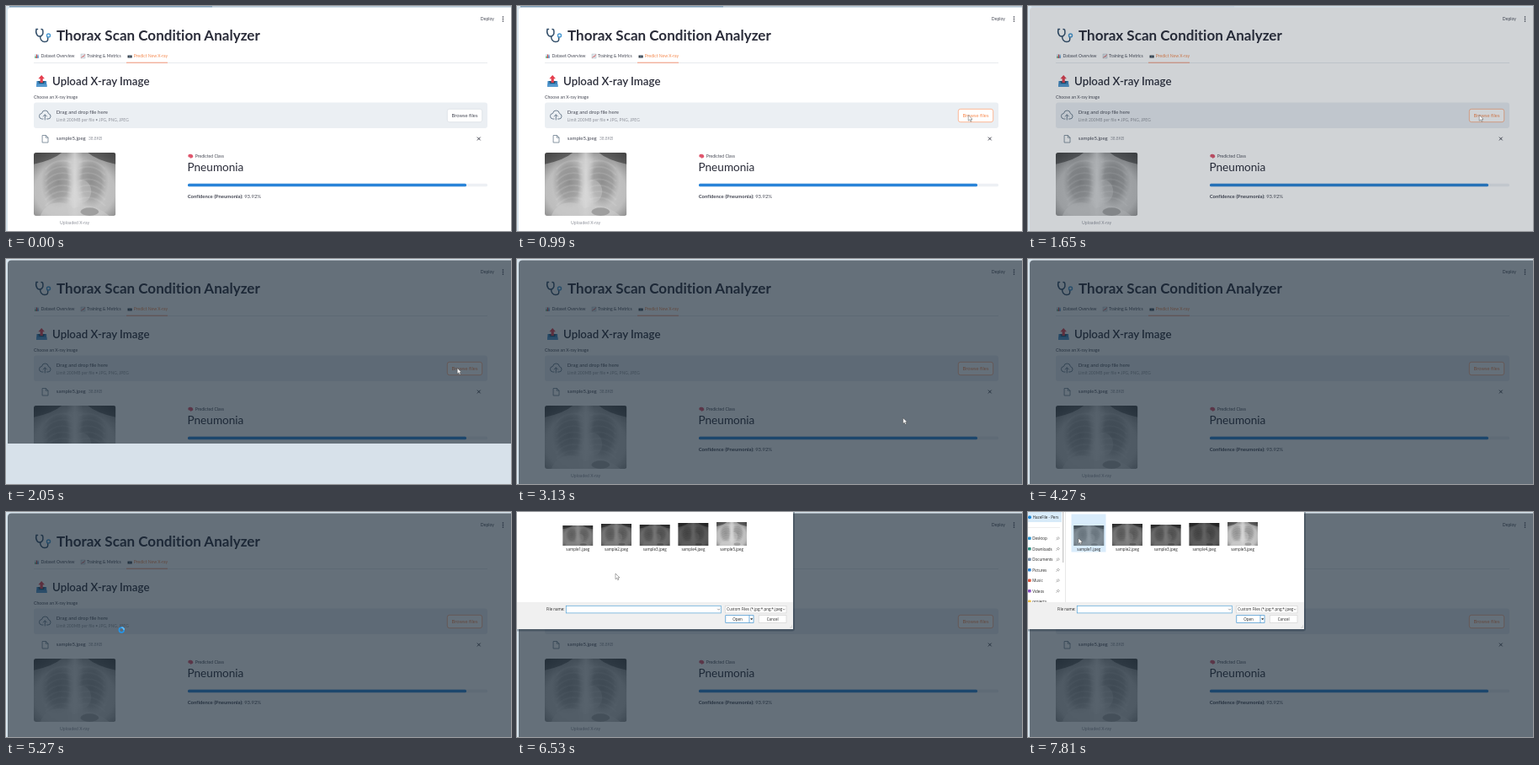
An HTML page that plays this animation: 600 px wide and 267 px high, repeating every 8 s.

```html
<!DOCTYPE html>
<html lang="en">
<head>
<meta charset="utf-8">
<title>Upload demo</title>
<style>
html, body { margin: 0; width: 100%; height: 100%; overflow: hidden; background: #fff; }
svg { display: block; }
#stage { width: 600px; height: 267px; }
text { font-family: Lato, sans-serif; fill: #484b57; white-space: pre; font-variant-ligatures: none; }
.strong { fill: #2b2d3a; }
.grey { fill: #92959e; }
#dialog text { font-family: "Open Sans", "Noto Sans", sans-serif; font-size: 4.5px; fill: #222; }
</style>
</head>
<body>
<svg id="stage" viewBox="0 0 600 267">
  <defs>
    <radialGradient id="lung">
      <stop offset="0" stop-color="#555" stop-opacity=".5"/>
      <stop offset=".6" stop-color="#5c5c5c" stop-opacity=".36"/>
      <stop offset="1" stop-color="#777" stop-opacity="0"/>
    </radialGradient>
    <radialGradient id="body" cx=".5" cy=".6" r=".75">
      <stop offset="0" stop-color="#d2d2d2"/>
      <stop offset=".65" stop-color="#bdbdbd"/>
      <stop offset="1" stop-color="#6a6a6a"/>
    </radialGradient>
    <linearGradient id="spine">
      <stop offset="0" stop-color="#dcdcdc" stop-opacity="0"/>
      <stop offset=".5" stop-color="#dcdcdc" stop-opacity=".7"/>
      <stop offset="1" stop-color="#dcdcdc" stop-opacity="0"/>
    </linearGradient>
    <symbol id="scan" viewBox="0 0 100 77" preserveAspectRatio="none">
      <rect width="100" height="77" fill="url(#body)"/>
      <path d="M0 0H34Q24 9 0 14ZM100 0H66Q76 9 100 14Z" fill="#222" opacity=".5"/>
      <ellipse cx="30" cy="36" rx="21" ry="33" fill="url(#lung)"/>
      <ellipse cx="70" cy="35" rx="21" ry="33" fill="url(#lung)"/>
      <rect x="40" width="20" height="77" fill="url(#spine)"/>
      <ellipse cx="58" cy="47" rx="12" ry="14" fill="#d4d4d4" opacity=".35"/>
      <path id="ribs" fill="none" stroke="#eee" stroke-width="2" opacity=".13"/>
      <path d="M8 77Q14 62 28 61T48 68Q70 58 92 77Z" fill="#ccc" opacity=".6"/>
      <ellipse cx="68" cy="72" rx="11" ry="5" fill="#555" opacity=".35"/>
    </symbol>
    <clipPath id="photo"><rect x="33" y="174" width="97.500" height="75" rx="3"/></clipPath>
  </defs>

  <rect width="600" height="267" fill="#d7e4ed"/>
  <path d="M2 267V6Q2 1.500 6.500 1.500H600V267Z" fill="#fff"/>
  <g id="topline"><path d="M4 .7H245" stroke="#7d9cb5" stroke-width="1.400"/><path d="M245 .7H600" stroke="#b3c5d3" stroke-width="1.400"/></g>

  <g id="page">
    <!-- stethoscope -->
    <g fill="none" stroke="#35506b" stroke-width="1.500" stroke-linecap="round">
      <path d="M37.500 27.500H36Q35 32 37 34.500T42 35.500Q45 33 43.500 28L42 27.500M40.500 36Q41 42.500 46 42.500T49.500 37"/>
      <circle cx="50.500" cy="35" r="2" stroke="#4b9ad2"/>
    </g>

    <!-- tabs -->
    <path d="M33 67.500H572" stroke="#e3e6ea" stroke-width=".8"/>
    <path d="M143 67.200H192" stroke="#f9805c" stroke-width=".8"/>
    <rect x="34" y="57" width="5" height="5" fill="#dbe6ef"/>
    <path d="M35 62V59.500" stroke="#3a9c58" stroke-width="1.100"/><path d="M36.500 62V57.500" stroke="#d74545" stroke-width="1.100"/><path d="M38 62V58.500" stroke="#2c79c5" stroke-width="1.100"/>
    <rect x="89" y="57" width="5" height="5" fill="#e3e9ee" stroke="#9caab5" stroke-width=".4"/>
    <path d="M89.500 61.500L91 59.500L92 60.300L93.700 57.500" fill="none" stroke="#cf4545" stroke-width=".7"/>
    <path d="M144.500 58.500H149.700V61.500H144.500Z" fill="#36414c"/><circle cx="147.100" cy="60" r=".8" fill="#7fa3bd"/>

    <!-- outbox -->
    <path d="M36.500 89H48L48.500 96H36Z" fill="#3f88c2"/><path d="M38 89H46.500L45 92H39.500Z" fill="#235577"/><path d="M36 93H48.500V96H36Z" fill="#559acf"/>
    <path d="M42.200 82L46 86.300H43.800V91H40.600V86.300H38.400Z" fill="#e5404f"/>

    <!-- uploader -->
    <rect x="33" y="114.500" width="539" height="30.500" rx="3" fill="#ebeff3"/>
    <g fill="none" stroke="#6d7e8f" stroke-width="1" stroke-linecap="round" stroke-linejoin="round">
      <path d="M44 134H42.500Q39.300 133.500 39.500 130.500T42.500 127.500Q43 124 46.500 124T50.500 127.700Q53.300 128.300 53 131.200T50 134H48.500M46.300 135V129M44.200 131L46.300 128.900L48.400 131"/>
      <path d="M43.500 153.500H47.500L50 156V162H43.500ZM47.300 153.700V156.200H49.800" stroke-width=".8"/>
    </g>
    <rect id="btn" x="524.300" y="122.300" width="41.400" height="15.400" rx="2.500" fill="#fff" stroke-width=".7"/>
    <path d="M559.900 155.600L563.700 159.400M563.700 155.600L559.900 159.400" stroke="#31333f" stroke-width=".9"/>

    <!-- result -->
    <g clip-path="url(#photo)"><use href="#scan" x="33" y="174" width="97.500" height="75"/></g>
    <path d="M216.200 178Q216.500 175.500 219 175.800Q222 175.800 222.300 178.500Q222 180.500 220.300 180.200L219.500 181L218.700 179.800Q216.500 180 216.200 178Z" fill="#e0566d"/>
    <rect x="216" y="210.700" width="356" height="3.600" rx="1.500" fill="#edf0f4"/>
    <rect x="216" y="210.700" width="331" height="3.600" rx="1.500" fill="#2a84d8"/>
    <g fill="#31333f"><circle cx="590.500" cy="13" r=".8"/><circle cx="590.500" cy="15.500" r=".8"/><circle cx="590.500" cy="18" r=".8"/></g>
  </g>

  <path id="dim" d="M2 267V6Q2 1.500 6.500 1.500H600V267Z" fill="#162736"/>
  <rect id="sheet" x="1" y="219" width="599" height="48" fill="#d7e1ea"/>

  <g id="dialog">
    <rect x="-8" y="-8" width="338" height="149.500" rx="3" fill="#122636" opacity=".3"/>
    <rect x="-20" y="-20" width="348" height="159" fill="#fff"/>
    <rect x="-20" y="107" width="348" height="32" fill="#f0f0f0"/>
    <g fill="#fff" stroke-width=".7">
      <rect x="58.300" y="111.300" width="184" height="8.600" stroke="#56a3d6"/>
      <rect x="247.300" y="111.300" width="72.700" height="8.600" stroke="#d5d5d5"/>
      <rect x="247.800" y="122.700" width="33.200" height="8.600" stroke="#3b8fce"/>
      <rect x="287.300" y="122.700" width="32.700" height="8.600" stroke="#d5d5d5"/>
      <path d="M276 122.700V131.300" stroke="#3b8fce"/>
    </g>
    <path d="M238.300 114.900L239.600 116.200L240.900 114.900M315.800 114.900L317.100 116.200L318.400 114.900" fill="none" stroke="#555" stroke-width=".6"/>
    <path d="M277.200 126.300H280.200L278.700 128.200Z" fill="#222"/>
    <path d="M326.500 134.500V137H324" fill="none" stroke="#aaa" stroke-width=".7" stroke-dasharray=".8 .7"/>
    <g id="files"></g>
    <g id="side">
      <rect x="0" y="0" width="45" height="107" fill="#fff"/>
      <rect x="0" y="0" width="40" height="12" fill="#d8ebf9"/>
      <path d="M0 18.500H38" stroke="#e2e2e2" stroke-width=".6"/>
      <path d="M44.500 0V107" stroke="#e2e2e2" stroke-width=".8"/>
      <path d="M41.700 0V60" stroke="#c4c4c4" stroke-width="1.200"/>
    </g>
  </g>

  <path id="arrow" d="M0 0V6.700L1.600 5.300L2.700 7.700L3.900 7.200L2.800 4.900H4.900Z" fill="#fff" stroke="#444" stroke-width=".45"/>
  <g id="busy">
    <circle r="2.900" fill="none" stroke="#2496ea" stroke-width="1.600"/>
    <path id="spin" d="M0 -2.900A2.900 2.900 0 0 1 2.900 0" fill="none" stroke="#62bdfa" stroke-width="1.600"/>
  </g>
</svg>

<script>
const $ = id => document.getElementById(id);

function add(parent, tag, attrs, label) {
  const el = document.createElementNS("http://www.w3.org/2000/svg", tag);
  for (const k in attrs) el.setAttribute(k, attrs[k]);
  if (label) el.textContent = label;
  return parent.appendChild(el);
}

function write(parent, x, y, size, label, extra) {
  return add(parent, "text", { x, y, "font-size": size, ...extra }, label);
}

// Page text
const page = $("page"), grey = { class: "grey" }, strong = { class: "strong" };
const middle = { "text-anchor": "middle" };
write(page, 60, 41, 17.05, "Thorax Scan Condition Analyzer", { "font-weight": 700, ...strong });
write(page, 55, 94, 13.3, "Upload X-ray Image", { "font-weight": 600, ...strong });
write(page, 41.5, 61.3, 5.05, "Dataset Overview");
write(page, 96, 61.3, 5.1, "Training & Metrics");
write(page, 151.8, 61.3, 5.05, "Predict New X-ray", { style: "fill:#f58a50" });
write(page, 33, 109.7, 5.2, "Choose an X-ray image");
write(page, 59.8, 127.8, 6.05, "Drag and drop file here");
write(page, 59.8, 137.3, 5, "Limit 200MB per file • JPG, PNG, JPEG", grey);
const btnText = write(page, 545, 132.1, 5.8, "Browse files", middle);
write(page, 59.8, 159.3, 6.1, "sample5.jpeg");
write(page, 98, 159.3, 4.9, "38.8KB", grey);
write(page, 81.7, 258.8, 5.15, "Uploaded X-ray", { ...middle, ...grey });
write(page, 224.8, 180.3, 5.1, "Predicted Class");
write(page, 215.5, 196.3, 13.6, "Pneumonia", strong);
const conf = write(page, 215.7, 227.5, 5.95, "");
add(conf, "tspan", { "font-weight": 700 }, "Confidence (Pneumonia):");
add(conf, "tspan", {}, " 93.92%");
write(page, 563.8, 17.4, 5.15, "Deploy");

// Ribs of the scan
let ribs = "";
for (let i = 0; i < 7; i++) {
  const y = 12 + i * 7.5;
  ribs += `M46 ${y}Q28 ${y - 7} 14 ${y + 8}M55 ${y}Q73 ${y - 7} 87 ${y + 8}`;
}
$("ribs").setAttribute("d", ribs);

// Dialog text
const dialog = $("dialog");
write(dialog, 35, 117.2, 4.5, "File name:");
write(dialog, 249.3, 117.2, 4.5, "Custom Files (*.jpg;*.png;*.jpeg");
write(dialog, 262, 128.6, 4.5, "Open", middle);
write(dialog, 303.7, 128.6, 4.5, "Cancel", middle);

// Files: top edge and darkness of each thumbnail
const cells = [[16, .36], [14, .4], [15, .46], [13, .54], [12, 0]].map(([top, dark], i) => {
  const x = 54.3 + i * 45.7, box = { x, y: top, width: 36, height: 40 - top };
  const files = $("files");
  const back = add(files, "rect", { x: x - 2.8, y: 2.5, width: 41, height: 45, fill: "#d9ecfb" });
  add(files, "use", { href: "#scan", ...box });
  add(files, "rect", { ...box, fill: "#000", opacity: dark });
  const tint = add(files, "rect", { ...box, fill: "#8cc4ee", opacity: .22 });
  write(files, x + 18, 45.6, 4.5, `sample${i + 1}.jpeg`, middle);
  return { x: x - 2.8, back, tint };
});

// Sidebar
const side = $("side");
add(side, "circle", { cx: 2, cy: 6.3, r: 2, fill: "#1b86d8" });
write(side, 5.8, 8, 4.5, "HazeFile - Pers");
const places = [["Desktop", "#2a93cf"], ["Downloads", "#2f8f83"], ["Documents", "#6f8ba8"],
  ["Pictures", "#2b85d6"], ["Music", "#e0563f"], ["Videos", "#8a4fc4"], ["projects", "#f0c04c"]];
places.forEach(([name, fill], i) => {
  const y = 31.5 + i * 12.5;
  add(side, "rect", { x: 0, y: y - 2, width: 3.6, height: 3.6, rx: .8, fill });
  if (i < 6) {
    const d = `M33.5 ${y + 1.8}l1.3 -1.3m-.8 -1.4l2.2 2.2m-1.5 -2l1.2 -1.2l1.5 1.5l-1.2 1.2`;
    add(side, "path", { d, fill: "none", stroke: "#777", "stroke-width": .6 });
  }
  write(side, 5.3, y + 1.6, 4.5, name);
});
// The footer edge cuts off the last entry
add(side, "rect", { x: 0, y: 107, width: 45, height: 3, fill: "#f0f0f0" });

// Keyframes: [time, ...values]
const cursorKeys = [[150, 546, 202], [700, 538, 133], [930, 536.8, 130], [990, 536.2, 129.5],
  [2200, 536.2, 129.5], [2240, 534.6, 129.5], [2750, 534.6, 129.5], [3510, 383.5, 247.3],
  [4600, 383.5, 247.3], [4601, 136.5, 140], [6220, 136.5, 140], [6530, 117, 73], [6970, 110, 77],
  [7060, 110, 77], [7650, 62, 33], [7810, 60, 31]];
const dimKeys = [[1270, 0], [1650, .2], [2050, .66]];
const sheetKeys = [[1900, 0], [2000, 1], [2410, 1], [2610, 0]];

const smooth = u => u * u * (3 - 2 * u);

function track(keys, t, ease = u => u) {
  if (t <= keys[0][0]) return keys[0].slice(1);
  for (let i = 1; i < keys.length; i++) {
    const [a, ...from] = keys[i - 1], [b, ...to] = keys[i];
    if (t < b) {
      const u = ease((t - a) / (b - a));
      return from.map((v, k) => v + (to[k] - v) * u);
    }
  }
  return keys[keys.length - 1].slice(1);
}

const show = (el, on) => el.setAttribute("visibility", on ? "visible" : "hidden");

function draw(t) {
  const [x, y] = track(cursorKeys, t, smooth);
  const [dim] = track(dimKeys, t);
  const waiting = t >= 5270 && t < 5540;

  $("dim").setAttribute("opacity", dim);
  $("topline").setAttribute("opacity", 1 - Math.min(1, dim / .25));
  $("sheet").setAttribute("opacity", track(sheetKeys, t)[0]);

  const hot = t >= 150 && y < 137 || t > 2000;
  $("btn").setAttribute("stroke", hot ? "#ff9c6c" : "#d9dde3");
  btnText.style.fill = hot ? "#f98b50" : "#484b57";

  const open = Math.max(0, Math.min(1, (t - 5840) / 220));
  const scale = .9 + .1 * smooth(open);
  show(dialog, open > 0);
  dialog.setAttribute("opacity", open);
  dialog.setAttribute("transform", `translate(${60 * (1 - scale)} 0) scale(${scale})`);
  $("files").setAttribute("display", t >= 6220 ? "inline" : "none");
  side.setAttribute("display", t >= 7060 ? "inline" : "none");
  for (const c of cells) {
    const over = t >= 6220 && x > c.x && x < c.x + 41 && y < 47.5;
    for (const el of [c.back, c.tint]) el.setAttribute("display", over ? "inline" : "none");
  }

  show($("arrow"), t >= 150 && !(t >= 4110 && t < 4670) && !waiting);
  $("arrow").setAttribute("transform", `translate(${x} ${y})`);
  show($("busy"), waiting);
  $("busy").setAttribute("transform", "translate(137.3 140)");
  $("spin").setAttribute("transform", `rotate(${(t - 5270) * .6})`);
}

const start = performance.now();
function tick() {
  draw((performance.now() - start) % 8000);
  requestAnimationFrame(tick);
}
tick();
</script>
</body>
</html>
```
